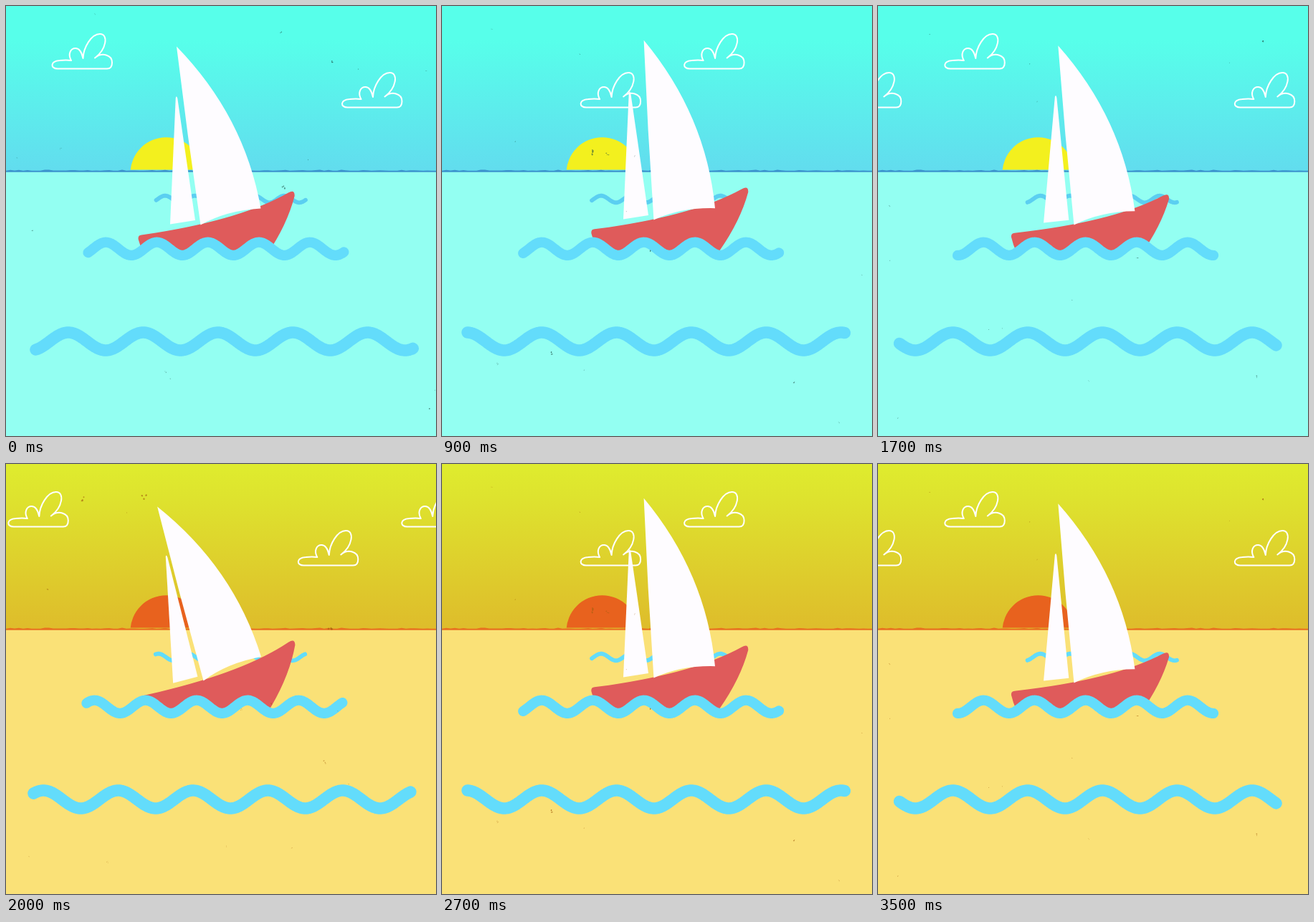
These frames come from a looping animation (600x600 px, 3600 ms). An HTML page with a canvas:

```html
<!DOCTYPE html>
<html lang="en">
<head>
<meta charset="utf-8">
<title>Sailing boat</title>
<style>
html, body { margin: 0; width: 100%; height: 100%; overflow: hidden; }
canvas { display: block; width: 600px; height: 600px; }
</style>
</head>
<body>
<canvas id="stage" width="600" height="600"></canvas>
<script>
const ctx = document.getElementById('stage').getContext('2d');
const CYCLE = 1800, STEP = 100, TAU = Math.PI * 2;

const day = {
  sky: ['#57ffea', '#57ffea', '#62dcee'], sea: '#93fff2', sun: '#f3f01e',
  line: '#3b93cd', farWave: '#5bcff1', dust: 'rgba(30,75,65,.6)'
};
const dusk = {
  sky: ['#dfec2e', '#dee32e', '#debc2b'], sea: '#fae177', sun: '#e8621e',
  line: '#e8701f', farWave: '#62dcfa', dust: 'rgba(165,95,15,.65)'
};

// len = wavelength, crest = x of a crest at time 0, laps = wavelengths per cycle,
// left/span = trimmed part of the line, drift = px per ms
const far = { y: 269.5, amp: 4.8, width: 5.8, len: 41.6, crest: 222, laps: 2, left: 209.3, span: 208.4, drift: 0.0006 };
const mid = { y: 338.8, amp: 9.1, width: 14.2, len: 71.2, crest: 139.3, laps: 2, left: 113.6, span: 357, drift: 0.0015 };
const near = { y: 468, amp: 12.5, width: 16.5, len: 104.4, crest: 87, laps: 3, left: 40.7, span: 526, drift: 0.00594 };

// Boat pose: foot of the mast, and the turn of each part around it
const times = [0, 200, 500, 900, 1300, 1700];
const pose = {
  x: [271, 275, 283, 295, 288, 273],
  y: [305, 302, 298, 298, 304, 305],
  hull: [0, -4.2, -10.5, 0.8, 7, 2],
  main: [0, -7.2, -17.4, 4.5, 12, 2.6],
  jib: [0, -5.9, -15.8, 0, 10, 2.6]
};

const hull = new Path2D('M184.8 326Q183.5 320 189 319.5L209 316.5Q330 297 394 260.5Q403 255.5 402.7 265Q392.5 305 364 347L345 375H205L188 336Z');
const mainSail = new Path2D('M238 56.5Q333 154 355.5 282.5Q308 285 271.5 305.5Q253 181 238 56.5Z');
const jib = new Path2D('M236.8 128Q238 124 239.3 129L264 299L229 304.5Z');
const cloud = new Path2D('M72 87.5C62 87.5 61 77 75 76Q84 75 91 76C86 67 90 59 97 59C103 59 106 66 107.5 73C108 58 119 39 131 39C143.5 39 140 61 124 72.5C134 64 148 68 148 79Q148 87.5 141 87.5Z');

function random(seed) {
  return () => {
    seed = (seed * 1664525 + 1013904223) >>> 0;
    return seed / 4294967296;
  };
}

// Smooth periodic curve through the pose keys
function track(values, t) {
  const n = times.length;
  const at = i => times[(i + n) % n] + CYCLE * Math.floor(i / n);
  const val = i => values[(i + n) % n];
  const slope = i => (val(i + 1) - val(i - 1)) / (at(i + 1) - at(i - 1));
  let i = n - 1;
  while (times[i] > t) i--;
  const d = at(i + 1) - at(i), u = (t - at(i)) / d, u2 = u * u, u3 = u2 * u;
  return val(i) * (2 * u3 - 3 * u2 + 1) + val(i + 1) * (3 * u2 - 2 * u3)
    + d * (slope(i) * (u3 - 2 * u2 + u) + slope(i + 1) * (u3 - u2));
}

function waveCrest(w, t) {
  return w.crest - w.laps * w.len * t / CYCLE;
}

function traceWave(w, t, from, to) {
  const k = TAU / w.len, crest = waveCrest(w, t);
  const point = x => ctx.lineTo(x, w.y - w.amp * Math.cos(k * (x - crest)));
  for (let x = from; x < to; x += 1.5) point(x);
  point(to);
}

function drawWave(w, t, color) {
  // Trimming follows arc length, so the ends sway along x
  const k = TAU / w.len, crest = waveCrest(w, t), sway = (w.amp * k) ** 2 / (8 * k);
  const end = x => x + sway * Math.sin(2 * k * (x - crest));
  const left = w.left - w.drift * t;
  ctx.beginPath();
  traceWave(w, t, end(left), end(left + w.span));
  ctx.strokeStyle = color;
  ctx.lineWidth = w.width;
  ctx.lineCap = ctx.lineJoin = 'round';
  ctx.stroke();
}

function drawBackdrop(c) {
  const sky = ctx.createLinearGradient(0, 0, 0, 231);
  [0, 0.2, 1].forEach((stop, i) => sky.addColorStop(stop, c.sky[i]));
  ctx.fillStyle = sky;
  ctx.fillRect(0, 0, 600, 231);
  ctx.fillStyle = c.sea;
  ctx.fillRect(0, 231, 600, 369);

  ctx.save();
  ctx.beginPath();
  ctx.rect(0, 0, 600, 228.5);
  ctx.clip();
  ctx.fillStyle = c.sun;
  ctx.beginPath();
  ctx.arc(223.5, 233.3, 50, 0, TAU);
  ctx.fill();
  ctx.restore();

  // Ragged horizon
  const rnd = random(7);
  ctx.fillStyle = c.line;
  ctx.beginPath();
  ctx.moveTo(0, 231.7);
  for (let x = 0; x <= 600; x += 6) ctx.lineTo(x, 229.7 - rnd() ** 3 * 1.3);
  ctx.lineTo(600, 231.7);
  ctx.fill();
}

function drawClouds(t) {
  ctx.strokeStyle = '#fff';
  ctx.lineWidth = 2;
  for (const [x, y] of [[0, 0], [404.5, 54], [549, 0], [953.5, 54]]) {
    ctx.save();
    ctx.translate(x - 0.306 * t, y);
    ctx.stroke(cloud);
    ctx.restore();
  }
}

function drawPart(path, turns, t, color) {
  ctx.save();
  ctx.translate(track(pose.x, t), track(pose.y, t));
  ctx.rotate(track(turns, t) * Math.PI / 180);
  ctx.translate(-271, -305);
  ctx.fillStyle = color;
  ctx.fill(path);
  ctx.restore();
}

function drawBoat(t) {
  ctx.save();
  ctx.beginPath();
  ctx.moveTo(0, 0);
  traceWave(mid, t, 0, 600);
  ctx.lineTo(600, 0);
  ctx.clip();
  drawPart(hull, pose.hull, t, '#df5b5b');
  ctx.restore();
  drawPart(jib, pose.jib, t, '#fefcff');
  drawPart(mainSail, pose.main, t, '#fefcff');
}

function drawDust(t, color) {
  const rnd = random(t * 977 + 41);
  rnd();
  ctx.fillStyle = color;
  for (let i = 0; i < 14; i++) {
    const x = rnd() * 600, y = rnd() * 600, size = 0.4 + rnd() ** 3 * 1.6;
    for (let j = 0; j < 3; j++) {
      ctx.beginPath();
      ctx.ellipse(x + (rnd() - 0.5) * size * 4, y + (rnd() - 0.5) * size * 4,
        size * (0.5 + rnd() * 0.6), size * 0.6, rnd() * TAU, 0, TAU);
      ctx.fill();
    }
  }
}

function draw() {
  const now = Math.floor(performance.now() / STEP) * STEP % (2 * CYCLE);
  const t = now % CYCLE, c = now < CYCLE ? day : dusk;
  drawBackdrop(c);
  drawClouds(t);
  drawWave(far, t, c.farWave);
  drawBoat(t);
  drawWave(mid, t, '#63dcfb');
  drawWave(near, t, '#63dcfb');
  drawDust(t, c.dust);
  requestAnimationFrame(draw);
}
draw();
</script>
</body>
</html>
```
